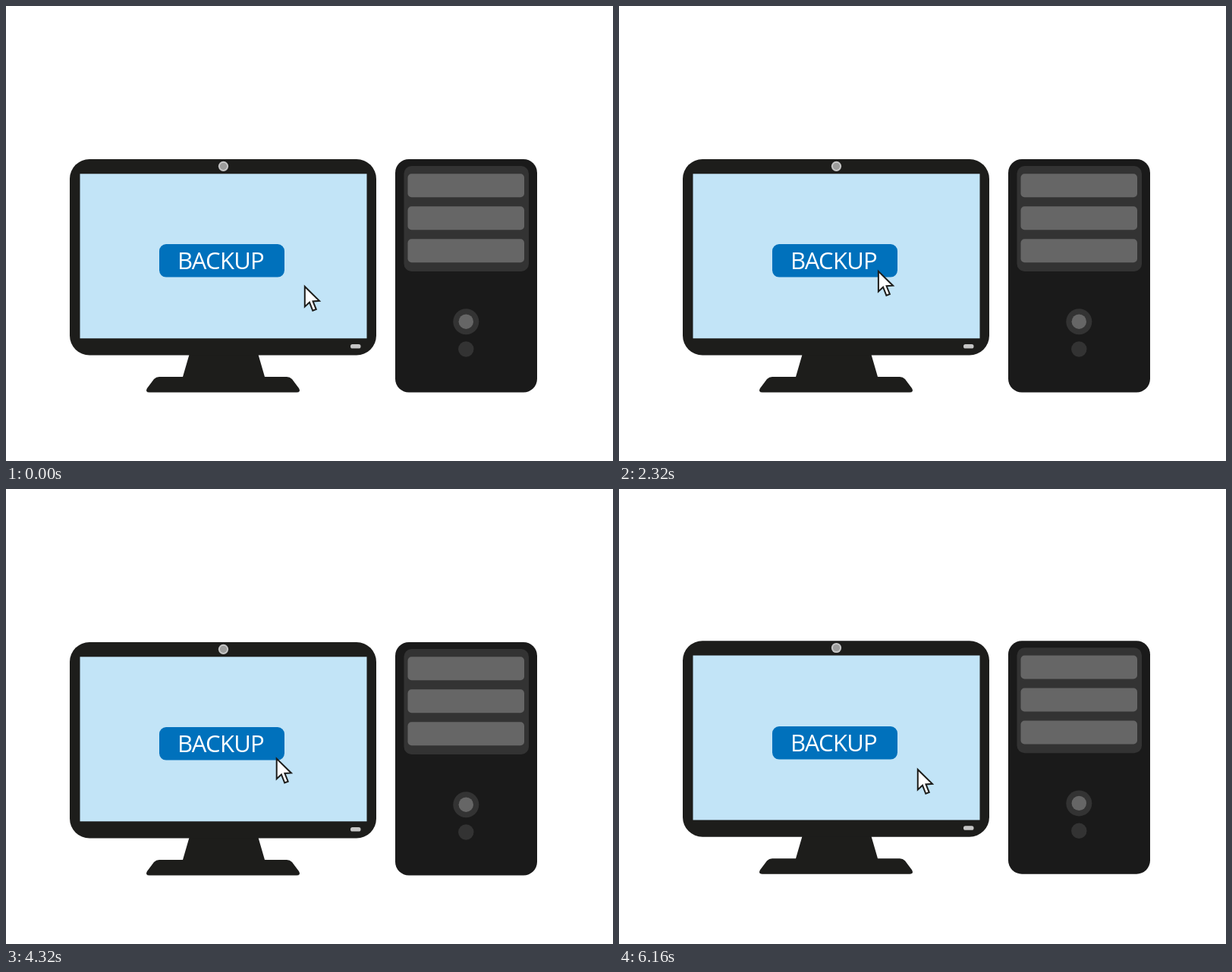
An HTML page for the animation above (6200 ms loop, 800 px wide and 600 px high).

```html
<!DOCTYPE html>
<html lang="en">
<head>
<meta charset="utf-8">
<title>Backup</title>
<style>
  html, body { margin: 0; width: 100%; height: 100%; overflow: hidden; background: #fff; }
  svg { display: block; width: 800px; height: 600px; }
  text { font: 31px "Open Sans", "Noto Sans", sans-serif; letter-spacing: -0.7px; fill: #fff; }
</style>
</head>
<body>
<svg viewBox="0 0 800 600">
  <defs>
    <g id="body">
      <path fill="#1d1d1b" d="M242 458H332L341 489H370Q374 489 377 492L386 504Q389 509.5 383 509.5H189Q183 509.5 186 504L195 492Q198 489 202 489H233Z"/>
      <rect x="84" y="202" width="404" height="258.5" rx="26" fill="#1d1d1b"/>
      <circle cx="286.5" cy="211.3" r="6.6" fill="#c6c6c6"/>
      <circle cx="286.5" cy="211.3" r="4.6" fill="#9d9d9c"/>
      <rect x="454" y="446" width="13.5" height="5.6" rx="2.6" fill="#c6c6c6"/>
      <rect x="97.5" y="221.3" width="378" height="217" fill="#c2e4f7"/>
      <rect x="513" y="202" width="187" height="307.5" rx="18" fill="#1a1a1a"/>
      <rect x="524.5" y="211" width="164.5" height="139" rx="10" fill="#333"/>
      <g fill="#666">
        <rect x="529.5" y="221.3" width="153.5" height="31" rx="5"/>
        <rect x="529.5" y="264.3" width="153.5" height="31" rx="5"/>
        <rect x="529.5" y="307.3" width="153.5" height="31" rx="5"/>
      </g>
      <circle cx="606.3" cy="416.2" r="17" fill="#333"/>
      <circle cx="606.3" cy="416.2" r="9.7" fill="#666"/>
      <circle cx="606.3" cy="452.5" r="10.2" fill="#333"/>
    </g>
    <path id="arrow" d="M.8 3V29.5L7 23.8L11.3 34.8L15.8 33L11.5 22.4L20 21.8Z" fill="#fff" stroke="#1d1d1b" stroke-width="2"/>
  </defs>

  <g id="near">
    <use href="#body"/>
    <rect id="button" x="202" y="314" width="165" height="43.6" rx="9"/>
    <text x="226" y="347">BACKUP</text>
    <use id="cursor" href="#arrow"/>
  </g>

  <g id="far">
    <use href="#body"/>
    <rect x="202" y="314.8" width="165" height="43.6" rx="9" fill="#0071bc"/>
    <text x="226" y="347.8">BACKUP</text>
    <use href="#arrow" x="393" y="368.8"/>
    <rect id="dark" x="98" y="221.8" width="377" height="216" fill="#04171f" stroke="#0a4560"/>
  </g>

  <path id="trail" fill="none" stroke="#0dabf8" stroke-width="10"/>
</svg>

<script>
const $ = id => document.getElementById(id);
const near = $('near'), far = $('far'), trail = $('trail');
const button = $('button'), cursor = $('cursor'), dark = $('dark');

const LOOP = 6200, STEP = 40, STARTS = [0, 2040, 4120];
const SPAN = 1333;                        // distance between the two computers
const RADIUS = 1280, TOP = 74, HALF = 701; // arc of the dashed trail
const PERIOD = 106.6, DASH = 53.3;

const ramp = (t, a, b) => Math.min(1, Math.max(0, (t - a) / (b - a)));
const move = (el, x, y) => el.setAttribute('transform', `translate(${x} ${y})`);

// Point on the arc at length s from its top
function point(s, cx) {
  const a = s / RADIUS;
  const x = cx + RADIUS * Math.sin(a), y = TOP + RADIUS * (1 - Math.cos(a));
  return `${x.toFixed(2)} ${y.toFixed(2)}`;
}

function dashes(tail, head, cx) {
  let d = '';
  for (let s = 0; s < head; s += PERIOD) {
    const a = Math.max(s, tail), b = Math.min(s + DASH, head);
    if (b > a) d += `M${point(a - HALF, cx)}A${RADIUS} ${RADIUS} 0 0 1 ${point(b - HALF, cx)}`;
  }
  return d;
}

function draw(time) {
  const now = Math.floor((time % LOOP) / STEP) * STEP;
  const t = now - STARTS.filter(s => s <= now).pop();

  const aim = ramp(t, 0, 480);
  move(cursor, 393 - 89 * aim, 367 - 34.5 * aim);
  button.setAttribute('fill', t >= 480 ? '#0062a6' : '#0071bc');

  const pan = SPAN * ramp(t, 600, 2040);
  move(near, -pan, 0);
  move(far, SPAN - pan, -1.8);
  dark.setAttribute('opacity', 1 - ramp(t, 1400, 1800));

  const tail = 2 * HALF * ramp(t, 1380, 2040);
  const head = 2 * HALF * ramp(t, 600, 1309);
  trail.setAttribute('d', dashes(tail, head, 283 + 0.9125 * (1320 - t)));
}

let start;
function tick(time) {
  start ??= time;
  draw(time - start);
  requestAnimationFrame(tick);
}
draw(0);
requestAnimationFrame(tick);
</script>
</body>
</html>
```
